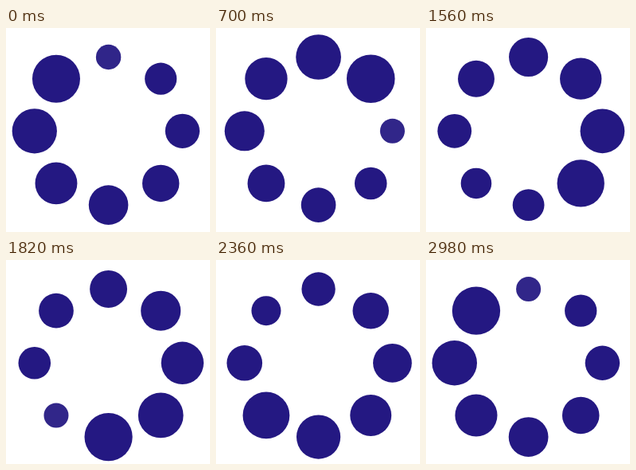
Animation, 256 px wide and 256 px high, one loop 3 s. Source, as an HTML page:

```html
<!DOCTYPE html>
<html lang="en">
<head>
<meta charset="utf-8">
<title>Spinner</title>
<style>
  html, body { margin: 0; width: 100%; height: 100%; overflow: hidden; background: #fff; }
  svg { display: block; width: 100%; height: 100%; }
</style>
</head>
<body>
<svg id="stage" viewBox="0 0 256 256" fill="#241882"></svg>
<script>
const LOOP = 3000, COUNT = 8, ORBIT = 92.8;
const CENTER = { x: 128.6, y: 129.3 };
const SMALL = 15.5, LARGE = 30.4;

const mix = (from, to, part) => from + (to - from) * part;

// Quick swell, long steady shrink, then a faster drop to the resting size.
function radiusAt(age) {
  const swell = 330, drop = 2640, rest = 2930, beforeDrop = 20;
  if (age < swell) return mix(SMALL, LARGE, (age / swell) ** 0.72);
  if (age < drop) {
    const part = (age - swell) / (drop - swell);
    return mix(LARGE, beforeDrop, mix(part, Math.sqrt(part), 0.15));
  }
  return mix(beforeDrop, SMALL, Math.min(1, (age - drop) / (rest - drop)));
}

const stage = document.getElementById("stage");
const dots = Array.from({ length: COUNT }, (_, i) => {
  const angle = i / COUNT * 2 * Math.PI;
  const dot = document.createElementNS("http://www.w3.org/2000/svg", "circle");
  dot.setAttribute("cx", CENTER.x + ORBIT * Math.sin(angle));
  dot.setAttribute("cy", CENTER.y - ORBIT * Math.cos(angle));
  return stage.appendChild(dot);
});

function render(time) {
  dots.forEach((dot, i) => {
    const age = (time % LOOP + LOOP - i * LOOP / COUNT) % LOOP;
    const radius = radiusAt(age);
    dot.setAttribute("r", radius);
    dot.setAttribute("opacity", radius < SMALL + 1 ? 0.94 : 1);
  });
}

const start = performance.now();
function tick() {
  render(performance.now() - start);
  requestAnimationFrame(tick);
}
tick();
</script>
</body>
</html>
```
